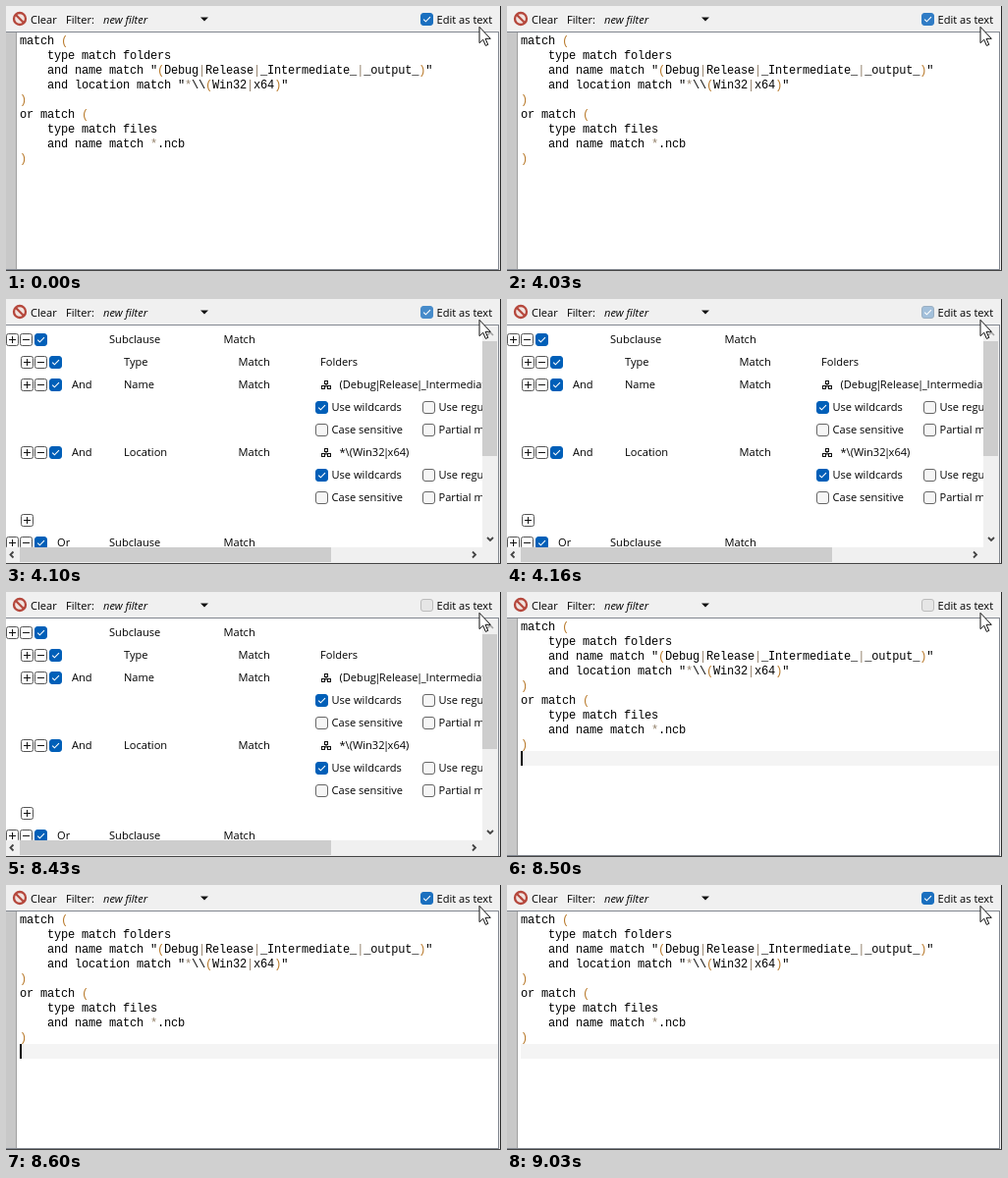
Animation of 504x270 px, one loop 9.13 s. Source, as an HTML page:

```html
<!DOCTYPE html>
<html lang="en">
<head>
<meta charset="utf-8">
<title>Filter editor</title>
<style>
  html, body { margin: 0; width: 100%; height: 100%; overflow: hidden; background: #f0f0f0; }
  svg { display: block; }
  text { font: 11.1px "Open Sans", "Noto Sans", sans-serif; white-space: pre; }
  .italic { font-style: italic; }
  .code { font: 12px "Liberation Mono", "Courier New", monospace; letter-spacing: -.2px; }
  .bar { letter-spacing: -1.6px; }
  .paren { fill: #b8792a; }
  .op { fill: #93806a; }
  .crisp { shape-rendering: crispEdges; }
</style>
</head>
<body>
<svg id="stage" width="504" height="270" viewBox="0 0 504 270"></svg>
<script>
const LOOP = 9130;
const BLUE = '#005fb8';
const INDENT = 15;

const rect = (x, y, w, h, fill, extra = '') =>
  `<rect x="${x}" y="${y}" width="${w}" height="${h}" fill="${fill}" ${extra}/>`;
const crisp = (x, y, w, h, fill) => rect(x, y, w, h, fill, 'class="crisp"');
const path = (d, stroke, width = 1, fill = 'none') =>
  `<path d="${d}" stroke="${stroke}" stroke-width="${width}" fill="${fill}"/>`;
const label = (x, y, s, extra = '') =>
  `<text x="${x}" y="${y}" ${extra}>${s.replace(/\|/g, '<tspan class="bar" dx="-1.5">|</tspan>')}</text>`;

const tick = (x, y) => path(`M${x + 3.2} ${y + 6.6}l2.2 2.2 4.6-4.7`, '#fff', 1.1);
const box = (x, y, fill, stroke) =>
  rect(x + .5, y + .5, 12, 12, fill, `rx="2.5" stroke="${stroke}"`);
const check = (x, y, on) => on ? box(x, y, BLUE, BLUE) + tick(x, y) : box(x, y, '#f6f6f6', '#666');

function sign(x, cy, plus) {
  return rect(x + .5, cy - 5.5, 12, 12, '#fff', 'rx="2" stroke="#555"') +
    crisp(x + 3, cy, 7, 1, '#111') + (plus ? crisp(x + 6, cy - 3, 1, 7, '#111') : '');
}

// One clause line: buttons, optional joiner, property and operator
function clause(cy, x, joiner, property) {
  return sign(x, cy, true) + sign(x + 14, cy, false) + check(x + 29, cy - 6, true) +
    label(x + 52, cy + 4, joiner) + label(x + 105, cy + 4, property) +
    label(x + 221.5, cy + 4, 'Match');
}

function pattern(cy, value) {
  const node = (x, y) => rect(x + .5, y + .5, 3, 3, '#fff', 'stroke="#111"');
  const option = (x, y, on, s) => check(x, y - 6, on) + label(x + 16.5, y + 4, s);
  return path(`M326 ${cy}v2M323 ${cy + 2}h6`, '#111') +
    node(324, cy - 4) + node(321, cy + 1) + node(327, cy + 1) +
    label(339.5, cy + 4, value) +
    option(315, cy + 23, true, 'Use wildcards') + option(424, cy + 23, false, 'Use regular expression') +
    option(315, cy + 46, false, 'Case sensitive') + option(424, cy + 46, false, 'Partial match');
}

function scrollbars() {
  return crisp(485, 27, 16, 242, '#f0f0f0') + crisp(0, 253, 501, 16, '#f0f0f0') +
    crisp(485, 43, 15, 117, '#cdcdcd') + crisp(14, 253, 317, 15, '#cdcdcd') +
    path('M490 37l3-3 3 3', '#a0a0a0', 1.6) +
    path('M490 243l3 3 3-3M475 257.5l3 3-3 3M7.5 257.5l-3 3 3 3', '#444', 1.8);
}

const frame = crisp(0, 26, 502, 1, '#828790') + crisp(501, 26, 1, 243, '#828790') +
  crisp(503, 0, 1, 270, '#2a2a2a') + crisp(0, 269, 504, 1, '#444');

const toolbar =
  '<circle cx="14" cy="13" r="6" fill="#f1e4e0" stroke="#b5473c" stroke-width="2.3"/>' +
  path('M10 9l8 8', '#b5473c', 2.3) +
  label(25, 18, 'Clear') + label(61, 18, 'Filter:') +
  label(99, 18, 'new filter', 'class="italic"') +
  path('M198 11.5h8l-4 4z', 'none', 0, '#111') +
  label(438.5, 18, 'Edit as text');

const source = String.raw`match (
    type match folders
    and name match "(Debug|Release|_Intermediate_|_output_)"
    and location match "*\\(Win32|x64)"
)
or match (
    type match files
    and name match *.ncb
)`;
const paint = s => s.replace(/[()|*]/g, c =>
  `<tspan class="${'()'.includes(c) ? 'paren' : 'op'}">${c}</tspan>`);

const editor = crisp(0, 27, 501, 241, '#fff') + crisp(0, 27, 10, 241, '#c8c8c8') +
  crisp(10, 27, 1, 241, '#a0a0a0') + crisp(0, 268, 502, 1, '#828790') +
  '<g id="line">' + crisp(14, 162, 487, 15, '#f4f4f4') + '</g>' +
  source.split('\n').map((s, i) =>
    `<text class="code" x="14" y="${39 + 15 * i}">${paint(s)}</text>`).join('') +
  '<g id="caret">' + crisp(14, 162, 2, 15, '#000') + '</g>';

const tree = crisp(0, 27, 501, 241, '#fff') +
  '<g clip-path="url(#view)">' +
  clause(41, 0, '', 'Subclause') +
  clause(64, INDENT, '', 'Type') + label(320, 68, 'Folders') +
  clause(87, INDENT, 'And', 'Name') + pattern(87, '(Debug|Release|_Intermediate_|_output_)') +
  clause(156, INDENT, 'And', 'Location') + pattern(156, '*\\(Win32|x64)') +
  sign(INDENT, 225, true) +
  clause(248, 0, 'Or', 'Subclause') +
  '</g>' + scrollbars();

const pointer = path('M482 21.3v16.4l3.7-3.5 2.7 6.2 2.4-1-2.7-6.1h5.2z', '#111', 1, '#fff');

const $ = id => document.getElementById(id);
$('stage').innerHTML =
  '<clipPath id="view"><rect y="27" width="485" height="226"/></clipPath>' +
  crisp(0, 0, 504, 270, '#f0f0f0') + toolbar +
  `<g id="editor">${editor}</g><g id="tree">${tree}</g>` + frame +
  '<g id="toggle"></g>' + pointer;

// Start time, fill, border and tick of the toolbar checkbox
const states = [
  [0, '#1a6fbf', '#1a6fbf', true],
  [4030, '#307cc5', '#307cc5', true],
  [4100, '#468bca', '#468bca', true],
  [4160, '#a3c0db', '#9aafc2', true],
  [4260, '#f3f3f3', '#666', false],
  [8430, '#e6e6e6', '#bcbcbc', false],
  [8560, '#8fb4d8', '#8fb4d8', true],
  [8600, '#1a6fbf', '#1a6fbf', true]
];
const show = (id, on) => $(id).setAttribute('visibility', on ? 'inherit' : 'hidden');
let shown;

function draw(now) {
  const t = now % LOOP;
  const state = states.findLast(s => t >= s[0]);
  if (state !== shown) {
    const [, fill, stroke, ticked] = shown = state;
    $('toggle').innerHTML = box(422, 7, fill, stroke) + (ticked ? tick(422, 7) : '');
  }
  const treeOn = t >= 4100 && t < 8500;
  show('tree', treeOn);
  show('editor', !treeOn);
  show('line', t >= 8500);
  show('caret', t >= 8500 && t < 9030);
}

const start = performance.now();
function loop() {
  draw(performance.now() - start);
  requestAnimationFrame(loop);
}
loop();
</script>
</body>
</html>
```
